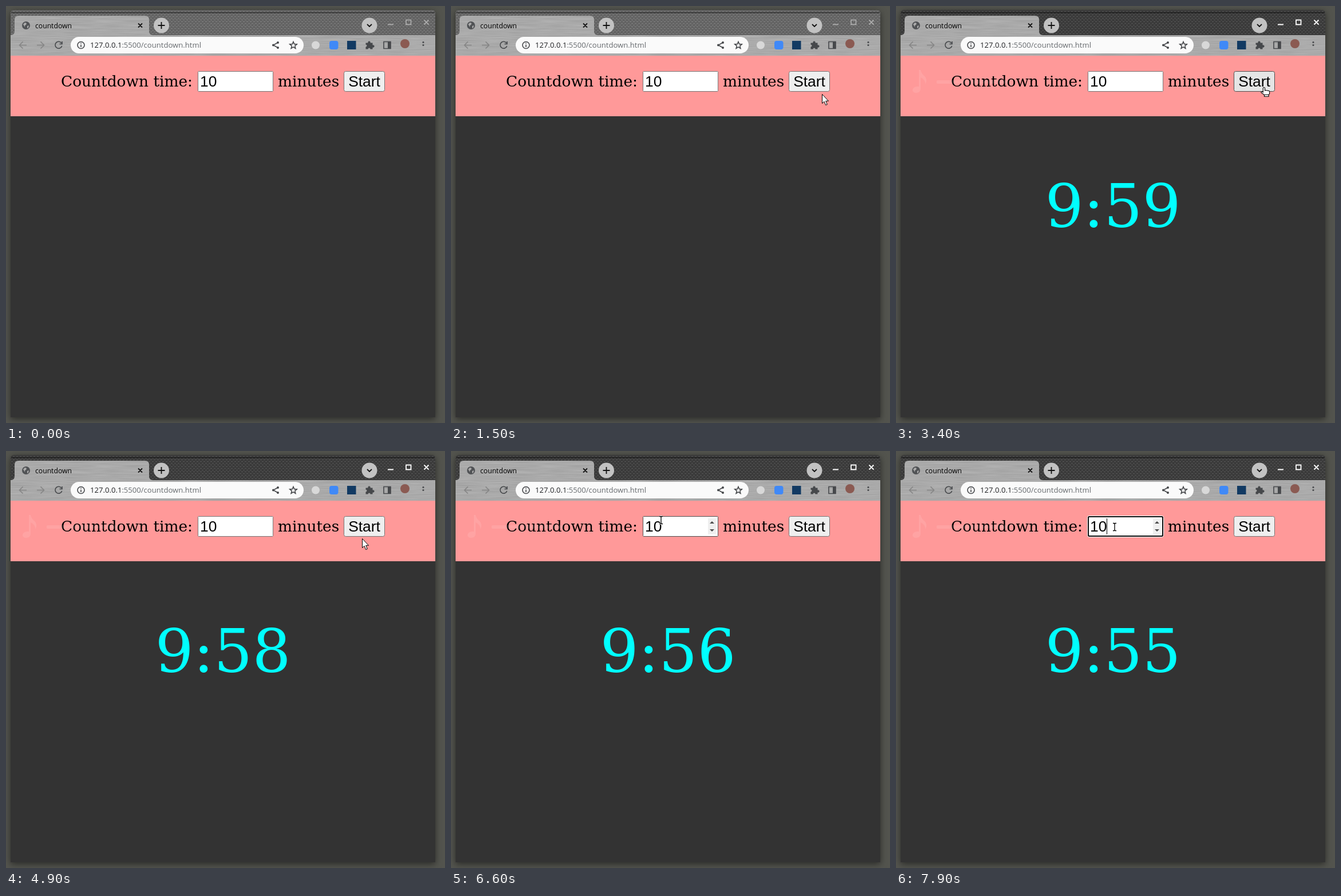
Write an HTML page that moves like this. It is 767 px wide and 730 px high and loops after 8000 ms.

```html
<!DOCTYPE html>
<html lang="en">
<head>
<meta charset="utf-8">
<title>countdown</title>
<style>
  html, body { margin: 0; width: 100%; height: 100%; overflow: hidden; background: #53544e; }
  #shadow { position: absolute; left: 8px; top: 7px; width: 742px; height: 713px;
    border-radius: 7px 7px 0 0; box-shadow: 0 3px 12px rgba(0,0,0,.5); }
  svg { position: absolute; left: 0; top: 0; }
  .ui { font-family: "Open Sans", "Noto Sans", sans-serif; }
  .serif { font: 26.4px "DejaVu Serif", serif; }
  .sans { font: 26.4px "Liberation Sans", Arial, sans-serif; }
  #timer { font-size: 105.6px; fill: #0ff; text-anchor: middle; }
  .icon { fill: none; stroke: #46484b; stroke-width: 1.6; }
  .dots { stroke-width: 4; stroke-linecap: round; }
</style>
</head>
<body>
<div id="shadow"></div>
<svg width="767" height="730" viewBox="0 0 767 730">
  <defs>
    <filter id="metal" x="0" y="0" width="1" height="1" color-interpolation-filters="sRGB">
      <feTurbulence type="fractalNoise" baseFrequency=".02 .7" numOctaves="2" seed="4"/>
      <feColorMatrix values=".12 0 0 0 .605  .12 0 0 0 .605  .12 0 0 0 .605  0 0 0 0 1"/>
      <feComposite in2="SourceAlpha" operator="in"/>
    </filter>
    <pattern id="weave" width="6" height="6" patternUnits="userSpaceOnUse">
      <path d="M0 1.5h3l3 1M0 5.5l3-1h3" fill="none" stroke="#000" stroke-opacity=".25"/>
      <path d="M0 3.5h3M3 .5h3" stroke="#fff" stroke-opacity=".11"/>
    </pattern>
    <path id="top" d="M8 51V13q0-6 6-6H744q6 0 6 6V51z"/>
    <path id="ibar" d="M-3-6.5h2L0-5.5l1-1h2M0-5.5v11M-3 6.5h2l1-1 1 1h2" fill="none"/>
  </defs>

  <!-- title bar and tab -->
  <use id="bar" href="#top"/>
  <use href="#top" fill="url(#weave)"/>
  <path d="M9 11.5H749" stroke="#000" stroke-opacity=".45" stroke-width="2"/>
  <path d="M8 51q7 0 7-7V24q0-7 7-7H243q7 0 7 7V44q0 7 7 7H750V87H8z" filter="url(#metal)"/>
  <circle cx="35" cy="34" r="7" fill="#505255"/>
  <path d="M30 32l3-3 3 1-1 3-2 1v3zM37 35l3-1-1 4-2 1z" fill="#aaa"/>
  <text class="ui" x="51" y="38.5" font-size="12.2">countdown</text>
  <g fill="#c2c2c2"><circle cx="271.5" cy="34" r="13.5"/><circle cx="635" cy="34" r="13.5"/></g>
  <path d="M231 30.5l7 7m0-7l-7 7M265.5 34h12m-6-6v12M631 32l4 4 4-4" fill="none" stroke="#111" stroke-width="1.8"/>
  <path id="controls" d="M667 32.5h10M699 24.5h8.500v8h-8.500zM730.500 24.500l8 8m0-8l-8 8" fill="none" stroke-width="1.8"/>

  <!-- toolbar -->
  <rect x="113" y="54" width="407" height="29" rx="14.5" fill="#fafafa"/>
  <g class="icon">
    <path d="M36 68.5H23.5m6-6l-6 6 6 6M54 68.5h12.5m-6-6l6 6-6 6" stroke="#858585"/>
    <path d="M97 65a6 6 0 1 0 .7 5M98 62v4.5h-4.5"/>
    <circle cx="131" cy="68.5" r="6"/>
    <path d="M131 67.5v4.5M131 64.5v1.5M475 64l-8 4.5 8 4.5"/>
    <path class="dots" d="M475 64h0M467 68.5h0M475 73h0"/>
    <path id="star"/>
    <path d="M660 62.5h12v12h-12z"/><path d="M669.5 62.5v12" stroke-width="5"/>
    <path class="dots" d="M729 63.5v10" stroke-dasharray="0 5" style="stroke-width:3.2"/>
  </g>
  <path d="M628.5 64.5h4a2.2 2.2 0 1 1 4 0h4v4a2.2 2.2 0 1 1 0 4v3h-4a2 2 0 1 0-4 0h-4v-4a2 2 0 1 0 0-4z" fill="#46484b"/>
  <text class="ui text" x="147" y="73" font-size="13.1" fill="#666a6e"><tspan fill="#202124">127.0.0.1</tspan>:5500/countdown.html</text>
  <circle cx="541" cy="68.5" r="7" fill="#d8d8d8"/>
  <rect x="565" y="61" width="15.5" height="15" rx="4" fill="#4089f7"/>
  <rect x="596" y="61" width="15.5" height="15" fill="#123a63"/>
  <circle cx="697" cy="66" r="8" fill="#8b5a52"/>

  <!-- page -->
  <rect x="8" y="87" width="742" height="633" fill="#333"/>
  <rect x="8" y="87" width="742" height="106" fill="#f99"/>
  <text class="serif text" x="96" y="141">Countdown time:</text>
  <text class="serif text" x="475" y="141">minutes</text>
  <rect id="field" class="text" x="335.5" y="114.5" width="131" height="35" rx="1" fill="#fff"/>
  <g id="spin">
    <rect x="449" y="118" width="14" height="28" fill="#efefef"/>
    <path d="M452 127l4-4 4 4zM452 137l4 4 4-4z" fill="#4a4a4a"/>
  </g>
  <g id="focus" fill="none">
    <rect x="334.5" y="113.5" width="133" height="37" rx="3" stroke="#fff"/>
    <rect x="336" y="115" width="130" height="34" rx="2" stroke="#101010" stroke-width="2"/>
    <path d="M368.5 118V146" stroke="#000"/>
  </g>
  <rect id="start" x="590.5" y="114.5" width="71" height="35" rx="3"/>
  <text class="sans" x="339" y="141">10</text>
  <text class="sans" x="598.2" y="141">Start</text>
  <text id="timer" class="serif" x="379" y="387"></text>
  <g id="note" fill="#fff" opacity=".1">
    <path d="M40 112h3q1 6 6 10 7 6 2 15 1-8-8-12V144q0 7-7 8-7 0-7-5 1-7 11-6z"/>
    <rect x="71" y="130" width="125" height="6" rx="2"/>
  </g>

  <!-- pointers, each with its hotspot at 0,0 -->
  <path id="arrow" d="M.5.5V16.500L4 13.200 6.700 19.500 9.300 18.400 6.700 12.300H11.500z" fill="#fff" stroke="#000"/>
  <g id="hand"><path transform="translate(-6 -1) scale(1.08 1)" fill="#fff" stroke="#000"
    d="M4 9V2q0-1.500 1.500-1.500T7 2V6q1.200-.8 2.400 0 1.200-.6 2.300.4 2-.4 2.800 1v4l-1.500 2v3H6V13.500L1 9.700Q.4 8 2 7.700zM6 13.400h7"/></g>
  <g id="beam">
    <use href="#ibar" stroke="#fff" stroke-width="3"/>
    <use href="#ibar" stroke="#000" stroke-width="1.3"/>
  </g>
</svg>
<script>
const $ = id => document.getElementById(id);
const show = (id, on) => $(id).setAttribute('visibility', on ? 'visible' : 'hidden');
const paint = (id, attrs) => { for (const k in attrs) $(id).setAttribute(k, attrs[k]); };
const ease = k => k * k * (3 - 2 * k);

// pointer moves: start time, end time, x, y
const home = [66, -21];
const moves = [
  [0, 900, 211, 174], [900, 1500, 648, 154], [1500, 1700, 645, 143],
  [1900, 2000, 643, 143], [3500, 3700, 641, 143], [3900, 4700, 623, 153],
  [4870, 5700, 360, 164], [5700, 6600, 367, 121],
  [6600, 7000, 370, 105], [7000, 7900, 382, 133]
];

function pointer(t) {
  let [x, y] = home;
  for (const [from, to, toX, toY] of moves) {
    const k = ease(Math.min(1, Math.max(0, (t - from) / (to - from))));
    x += (toX - x) * k;
    y += (toY - y) * k;
  }
  return [Math.round(x), Math.round(y)];
}

function over(el, [x, y]) {
  const b = el.getBBox();
  return x >= b.x && x < b.x + b.width && y >= b.y && y < b.y + b.height;
}

function clock(t) {
  if (t < 2300) return '';
  const left = 600 - Math.floor(Math.max(0, t - 2400) / 1000);
  return Math.floor(left / 60) + ':' + String(left % 60).padStart(2, '0');
}

const corners = Array.from({ length: 10 }, (_, i) => {
  const a = i * Math.PI / 5, r = i % 2 ? 2.9 : 6.5;
  return [502 + r * Math.sin(a), 69 - r * Math.cos(a)];
});
paint('star', { d: 'M' + corners.join('L') + 'z' });

const texts = [...document.querySelectorAll('.text')];

function draw(now) {
  const t = Math.floor(now % 8000 / 100) * 100;
  const pos = pointer(t), active = t >= 2200, focused = t >= 7700;
  const onStart = over($('start'), pos), onField = over($('field'), pos);
  const kind = onStart ? 'hand' : texts.some(el => over(el, pos)) ? 'beam' : 'arrow';
  for (const id of ['arrow', 'hand', 'beam']) show(id, id === kind);
  paint(kind, { transform: `translate(${pos})` });

  const edge = hover => hover ? '#4f4f4f' : '#767676';
  paint('bar', { fill: active ? '#414141' : '#6f6f6f' });
  paint('controls', { stroke: active ? '#fff' : '#aaa' });
  paint('start', { fill: onStart ? '#e5e5e5' : '#efefef', stroke: edge(onStart) });
  paint('field', { stroke: edge(onField) });
  show('spin', onField || focused);
  show('focus', focused);
  show('note', t >= 2300);
  $('timer').textContent = clock(t);
  requestAnimationFrame(draw);
}
requestAnimationFrame(draw);
</script>
</body>
</html>
```
